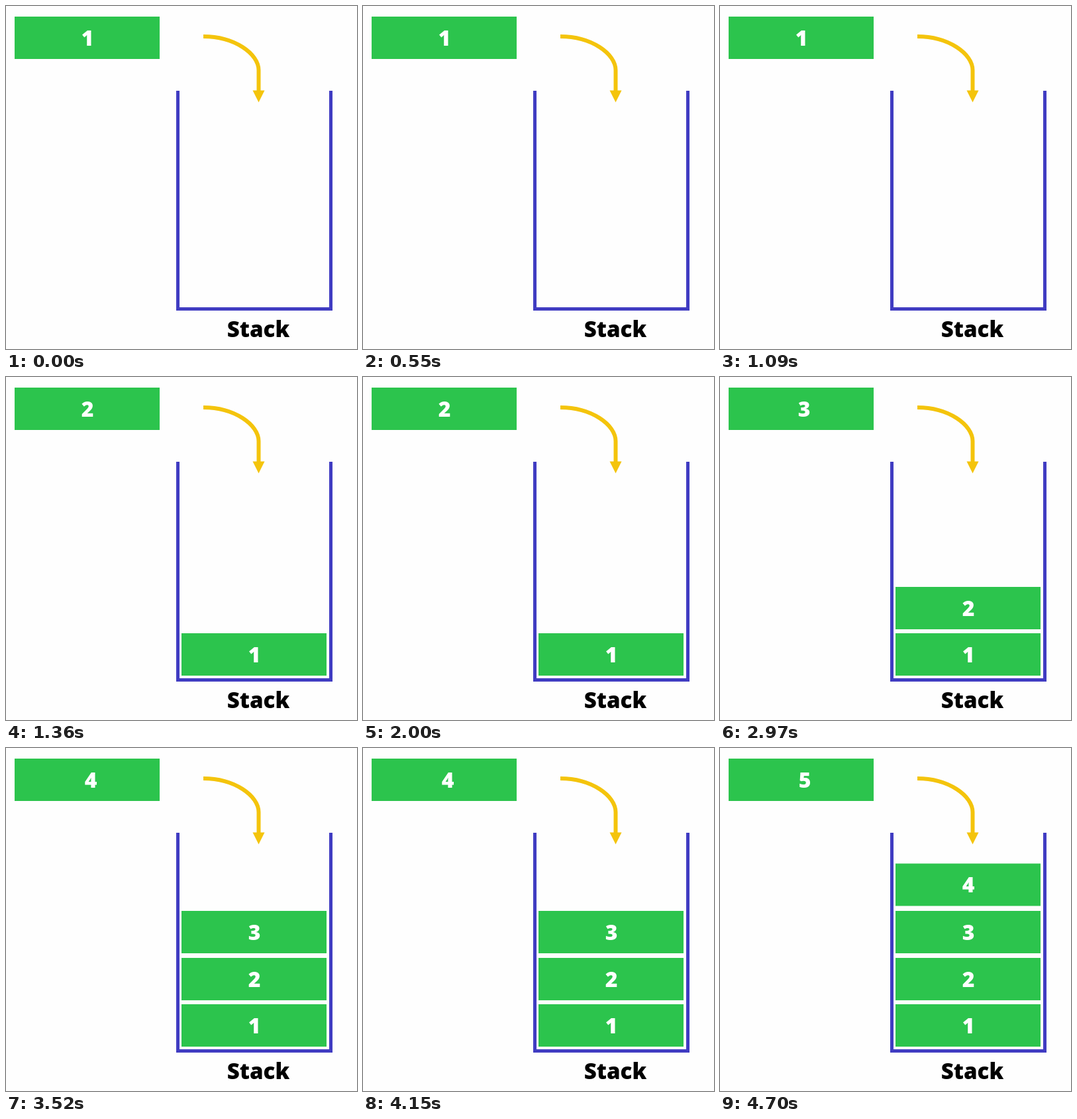
An HTML page that plays this animation: 530x518 px, repeating every 4.73 s.

```html
<!DOCTYPE html>
<html lang="en">
<head>
<meta charset="utf-8">
<title>Stack push</title>
<style>
  html, body { margin: 0; width: 100%; height: 100%; overflow: hidden; background: #fefefe; }
  svg { display: block; width: 530px; height: 518px; }
  text { font: 800 32px "Open Sans", sans-serif; text-anchor: middle; fill: #fff; }
  .label { font-size: 33px; fill: #000; }
  .block { fill: #2cc44d; }
</style>
</head>
<body>
<svg viewBox="0 0 530 518">
  <path d="M259.5 128V457.5H490.5V128" fill="none" stroke="#403cc2" stroke-width="5"/>
  <path d="M298 46C345 46 381.5 72 381.5 97V130" fill="none" stroke="#f4c40c" stroke-width="6"/>
  <path d="M372.5 127.5H390.5L381.5 145.5Z" fill="#f4c40c"/>
  <text class="label" x="381" y="499.5">Stack</text>
  <rect class="block" x="13" y="16" width="219" height="64"/>
  <text id="next" y="59.5">1</text>
  <g id="stack"></g>
</svg>
<script>
  const LOOP = 4730;
  const PUSH_TIMES = [1180, 2190, 3200, 4210];
  const BLOCK_TOPS = [387, 317, 246, 174.5];
  const NEXT_X = [123, 123, 127, 128, 128];

  const next = document.getElementById('next');
  const stack = document.getElementById('stack');

  function add(parent, tag, attrs) {
    const el = document.createElementNS('http://www.w3.org/2000/svg', tag);
    for (const key in attrs) el.setAttribute(key, attrs[key]);
    return parent.appendChild(el);
  }

  const blocks = BLOCK_TOPS.map((y, i) => {
    const group = add(stack, 'g', {});
    add(group, 'rect', { class: 'block', x: 265, y, width: 219, height: 64 });
    add(group, 'text', { x: 375, y: y + 43.5 }).textContent = i + 1;
    return group;
  });

  let shown = -1;

  function draw(now) {
    const time = now % LOOP;
    const count = PUSH_TIMES.filter(t => time >= t).length;
    if (count !== shown) {
      shown = count;
      next.textContent = count + 1;
      next.setAttribute('x', NEXT_X[count]);
      blocks.forEach((block, i) => {
        block.setAttribute('visibility', i < count ? 'visible' : 'hidden');
      });
    }
    requestAnimationFrame(draw);
  }

  draw(performance.now());
</script>
</body>
</html>
```
